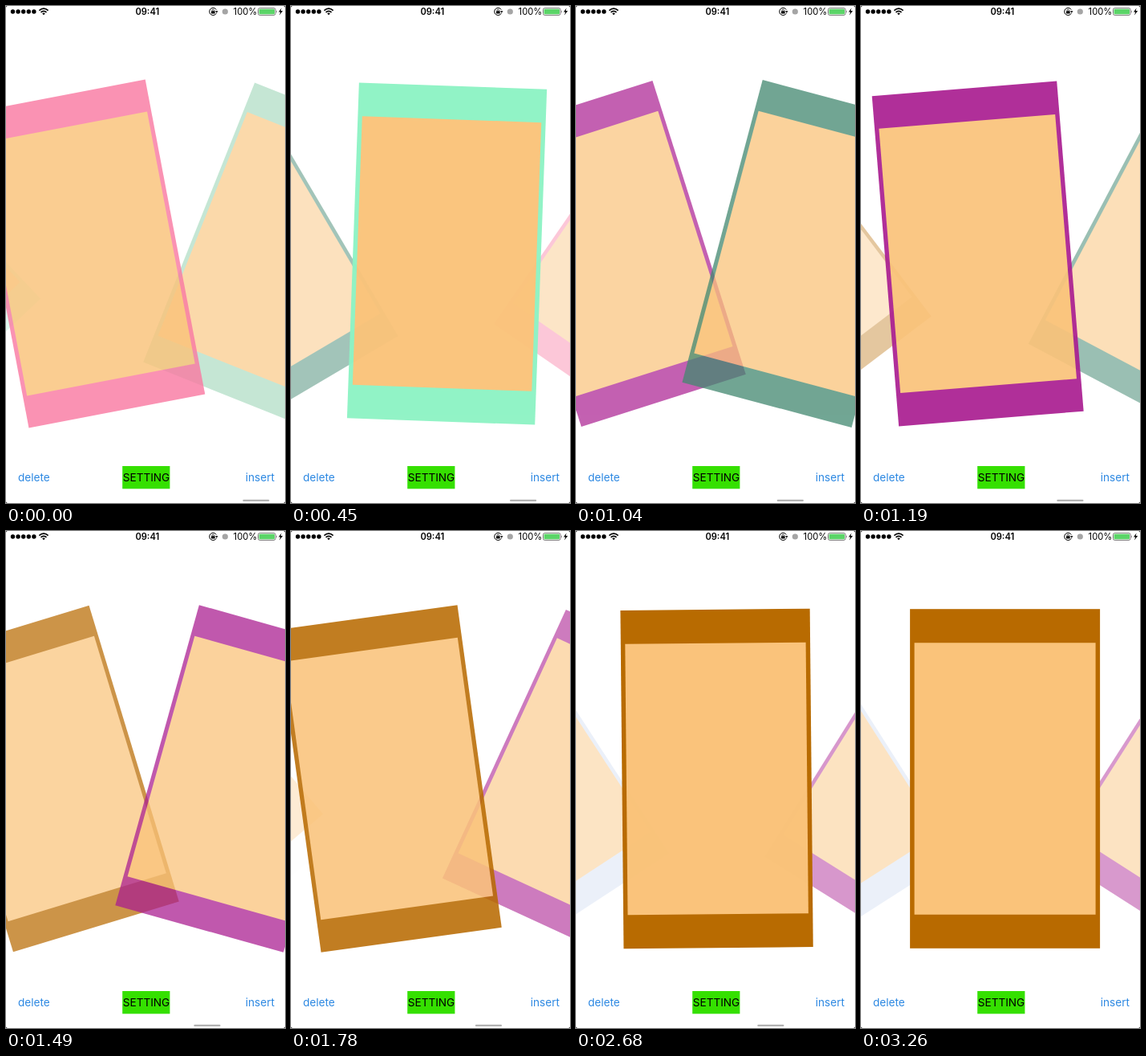
Write an HTML page that moves like this. It is 348 by 619 pixels and loops after 3.45 s.

```html
<!DOCTYPE html>
<html lang="en">
<head>
<meta charset="utf-8">
<title>Card carousel</title>
<style>
  html, body { margin: 0; width: 100%; height: 100%; overflow: hidden; background: #000; }
  svg { display: block; width: 100vw; height: 100vh; }
  text { font-family: Inter, Roboto, "Liberation Sans", sans-serif; }
  .button { font-size: 13.6px; fill: #2c88e2; }
</style>
</head>
<body>
<svg viewBox="0 0 348 619" preserveAspectRatio="none">
  <rect width="348" height="619" rx="2" fill="#fff"/>
  <g id="cards"></g>

  <g id="status">
    <g id="signal"></g>
    <g fill="none" stroke="#000" stroke-width="1.7">
      <path d="M41.4 5.6Q47 0.6 52.6 5.6"/>
      <path d="M43.5 7.9Q47 4.7 50.5 7.9"/>
    </g>
    <path d="M45.2 9.3Q47 7.7 48.8 9.3L47 11.2Z"/>
    <text x="176.3" y="11" font-size="11.1" font-weight="600" text-anchor="middle">09:41</text>
    <path d="M262.3 4.6A4.6 4.6 0 1 0 262.4 9.1" fill="none" stroke="#000"/>
    <path d="M260.9 6.2h3.6l-1.8 2.5z"/>
    <rect x="256" y="6.3" width="4.6" height="3.3" rx=".4"/>
    <path d="M257 6.5v-.8a1.3 1.3 0 0 1 2.6 0v.8" fill="none" stroke="#000" stroke-width=".8"/>
    <circle cx="273.3" cy="7" r="3.6" fill="#a5a5a5"/>
    <text x="283.6" y="11" font-size="11.2">100%</text>
    <rect x="314.5" y="2.6" width="21.6" height="8.8" rx="2" fill="#fff" stroke="#555" stroke-width=".8"/>
    <rect x="315.6" y="3.7" width="19.4" height="6.6" rx="1" fill="#5bd568"/>
    <path d="M337.1 5.2q1.6 1.8 0 3.6z" fill="#555"/>
    <path d="M343.6 2.4L340 7.6h2.3L341 11.6L345.2 6.1h-2.5z"/>
  </g>

  <rect x="145.2" y="573" width="59.2" height="28.3" fill="#35e000"/>
  <text class="button" x="15" y="592.3">delete</text>
  <text x="175" y="592.3" font-size="13.6" text-anchor="middle">SETTING</text>
  <text class="button" x="335" y="592.3" text-anchor="end">insert</text>
  <rect id="bar" y="614.8" width="33.2" height="2.2" rx="1.1" fill="#b1b1b1"/>
</svg>
<script>
const LOOP = 3450;
const CENTER = { x: 179.6, y: 308.5 };
const SPACING = 237.2, TURN = 32.55, SHRINK = 0.169, FADE = 0.55;

// moments at which the picture refreshes
const TICKS = [0, 150, 300, 450, 600, 750, 890, 1040, 1190, 1340, 1490, 1630,
  1780, 1930, 2080, 2230, 2380, 2530, 2680, 2820, 2970, 3110, 3260];

// [time in ms, scroll in cards, speed in cards per second]
const SCROLL = [
  [0, -4.331, 3.4], [450, -2.937, 2.45], [1040, -1.542, 2.7], [1490, -0.52, 1.38],
  [2080, -0.113, 0.31], [2680, -0.017, 0.05], [3110, 0, 0], [LOOP, 0, 0]
];

// left to right, the first sits one place left of the resting card
const COLORS = ['#d3def2', '#b86a00', '#aa1e91', '#428870', '#8ef3c4', '#f97ba3', '#a4d9bc'];
const TINT_TIME = 2230;

const byId = id => document.getElementById(id);

function add(parent, tag, attrs) {
  const el = document.createElementNS('http://www.w3.org/2000/svg', tag);
  for (const name in attrs) el.setAttribute(name, attrs[name]);
  return parent.appendChild(el);
}

function box(parent, w, h, fill) {
  return add(parent, 'rect', { x: -w / 2, y: -h / 2, width: w, height: h, fill });
}

for (let i = 0; i < 5; i++) {
  add(byId('signal'), 'circle', { cx: 8.5 + i * 6.6, cy: 7, r: 2.7 });
}

const cards = COLORS.map((color, i) => {
  const el = add(byId('cards'), 'g', {});
  const frame = box(el, 237, 422.6, color);
  box(el, 226, 338.5, '#fac37a');
  return { el, frame, slot: i - 1 };
});

function scrollAt(t) {
  let i = 0;
  while (i < SCROLL.length - 2 && t >= SCROLL[i + 1][0]) i++;
  const [t0, p0, v0] = SCROLL[i], [t1, p1, v1] = SCROLL[i + 1];
  const d = (t1 - t0) / 1000, u = (t - t0) / (t1 - t0), w = 1 - u;
  return w * w * ((1 + 2 * u) * p0 + u * d * v0) +
         u * u * ((3 - 2 * u) * p1 - w * d * v1);
}

function place(card, scroll) {
  const k = scroll + card.slot;
  card.far = Math.abs(k);
  const scale = 1 - SHRINK * card.far;
  const shown = card.far < 1.7;
  card.el.setAttribute('visibility', shown ? 'visible' : 'hidden');
  if (!shown) return;
  card.el.setAttribute('opacity', 1 - FADE * card.far);
  card.el.setAttribute('transform',
    `translate(${CENTER.x + SPACING * k} ${CENTER.y}) rotate(${TURN * k}) scale(${scale})`);
}

function draw(t) {
  const scroll = scrollAt(t);
  cards.forEach(card => place(card, scroll));
  // nearest card on top
  [...cards].sort((a, b) => b.far - a.far).forEach(c => byId('cards').appendChild(c.el));
  cards[0].frame.setAttribute('fill', t < TINT_TIME ? '#fcfcfe' : COLORS[0]);
  byId('bar').setAttribute('x', 226 - scroll * 16);
  byId('bar').setAttribute('visibility', t < 3260 ? 'visible' : 'hidden');
}

const start = performance.now();
let last = -1;

function loop() {
  const t = (performance.now() - start) % LOOP;
  const tick = TICKS.filter(x => x <= t).pop();
  if (tick !== last) draw(last = tick);
  requestAnimationFrame(loop);
}
loop();
</script>
</body>
</html>
```
